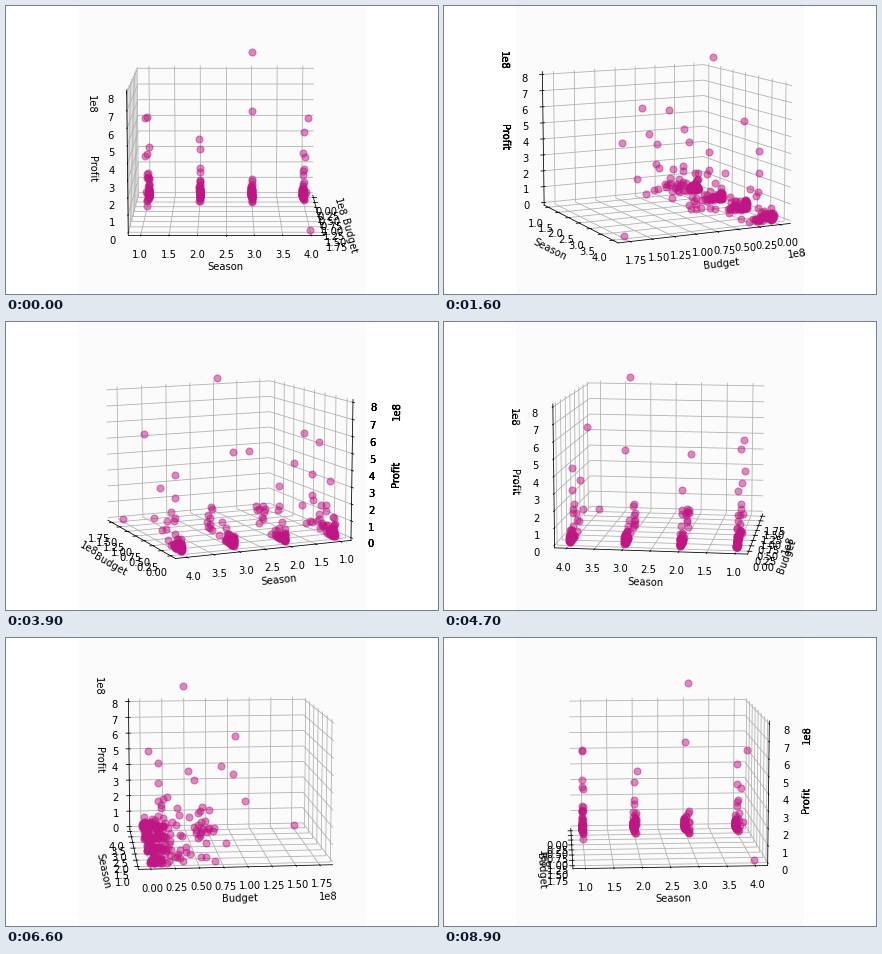
A matplotlib script that plays this animation: 432x288 px, repeating every 9 s.

```python
import numpy as np
import matplotlib.pyplot as plt
from matplotlib.animation import FuncAnimation

FRAMES, STEP = 90, 4
BACK = "#fbfbfb"
PINK = "#bf1683"
UNIT = 1e8
TOP_BUDGET = 1.754

# Standout (season, budget, profit), money in units of 1e8
HITS = [
    (1, .73, 5.58), (1, .39, 5.33), (1, .98, 3.5), (1, .54, 3.2),
    (1, .12, 3.2), (2, .92, 4.5), (2, .17, 3.1), (3, .44, 9.42),
    (3, .05, 5.46), (4, 1.07, 5.85), (4, .19, 4.2), (4, .19, 2.9),
    (4, .6, 3.08), (4, TOP_BUDGET, 0),
]


def make_data(crowd=50, middle=12):
    """Hits, a dense crowd near zero and a thin middle field per season."""
    rng = np.random.default_rng(7)
    parts = [np.array(HITS)]
    for season in range(1, 5):
        budget = np.append(np.minimum(rng.exponential(.09, crowd), .4),
                           rng.uniform(.1, .8, middle))
        profit = np.append(np.minimum(rng.exponential(.24, crowd), 1.1),
                           2.6 * rng.beta(1.3, 1.8, middle))
        parts.append(np.column_stack(
            [np.full(crowd + middle, season), budget, profit]))
    season, budget, profit = np.vstack(parts).T
    return budget * UNIT, season, profit * UNIT


def make_axes(zorder):
    ax = fig.add_axes([0, 0, 1, 1], projection="3d", zorder=zorder,
                      label=f"view{zorder}")
    ax.set(xlabel="Budget", ylabel="Season", zlabel="Profit")
    for axis in (ax.xaxis, ax.yaxis, ax.zaxis):
        axis.set_pane_color(BACK)
    return ax


def set_limits(ax):
    pad = 1 / 48
    edge = .05 * TOP_BUDGET * UNIT
    ax.set_xlim(-edge, TOP_BUDGET * UNIT + edge, view_margin=pad)
    ax.set_ylim(.85, 4.15, view_margin=pad)
    ax.set_zlim(0, 8 * UNIT, view_margin=pad)


fig = plt.figure(figsize=(6, 4), dpi=72, facecolor="white")

# Stacked copies harden the text edges outside the square plot area
copies = [make_axes(z) for z in range(3)]
for copy in copies:
    copy.patch.set_visible(False)
    copy.grid(False)
    copy.yaxis.set_visible(False)
    set_limits(copy)

main = make_axes(5)
main.patch.set_facecolor(BACK)
main.scatter(*make_data(), s=50, c=PINK, alpha=.5, depthshade=False)
set_limits(main)


def update(i):
    for ax in (*copies, main):
        ax.view_init(elev=10, azim=i * STEP)
    return []


anim = FuncAnimation(fig, update, frames=FRAMES, interval=100,
                     repeat=True, repeat_delay=0, blit=False,
                     init_func=lambda: update(0))
plt.show()
```
